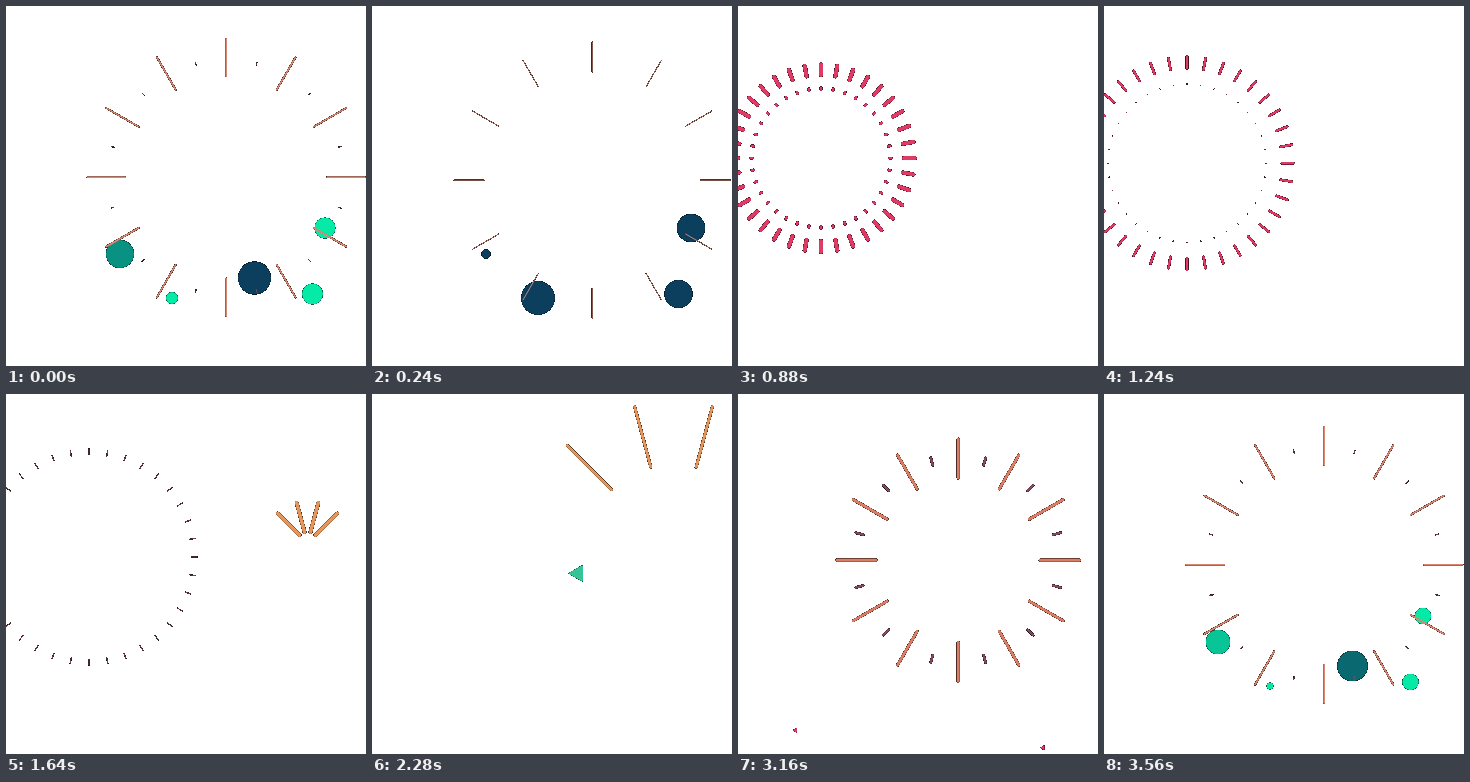
Animation, 360 px wide and 360 px high, one loop 3600 ms. Source, as an HTML page with a canvas:

```html
<!DOCTYPE html>
<html>
<head>
<meta charset="utf-8">
<style>
  html, body { margin: 0; width: 100%; height: 100%; overflow: hidden; background: #fff; }
  canvas { display: block; width: 360px; height: 360px; }
</style>
</head>
<body>
<canvas id="stage" width="360" height="360"></canvas>
<script>
const LOOP = 3600, SIZE = 360;
const ORANGE = [254, 142, 50], SAND = [228, 150, 92], CORAL = [228, 114, 86], BROWN = [208, 146, 128];
const CRIMSON = [222, 60, 102], MAUVE = [124, 76, 88], MINT = [5, 234, 166], NAVY = [12, 62, 94];
const ctx = document.getElementById('stage').getContext('2d', { willReadFrequently: true });

const clamp = v => Math.max(0, Math.min(1, v));
const settle = (age, tau) => 1 - Math.exp(-age / tau);
const mix = (a, b, k) => `rgb(${a.map((v, i) => Math.round(v + (b[i] - v) * k))})`;
const swell = power => p => Math.sin(Math.PI * p) ** power;
const fade = power => p => 1 - p ** power;

// Colour at progress p along evenly spaced stops.
function along(stops, p) {
  const pos = p * (stops.length - 1), i = Math.floor(pos);
  return mix(stops[i], stops[i + 1], pos - i);
}

// Rings of radial dashes; angles in degrees clockwise from the top.
const bursts = [
  { x: 83, y: 144, drift: .0143, start: 311, life: 1600, count: 36, from: 0, step: 10,
    reach: 107, tau: 325, width: 7.4, thin: fade(.8), length: 12, shape: swell(1),
    colors: [ORANGE, ORANGE, CRIMSON, CRIMSON, CRIMSON, MAUVE, MAUVE] },
  { x: 83, y: 144, drift: .0143, start: 311, life: 1100, count: 36, from: 0, step: 10,
    reach: 84, tau: 325, width: 5, thin: fade(1.3), length: 3.4, shape: fade(1),
    colors: [CRIMSON, CRIMSON, MAUVE] },
  { x: 301.5, y: 148, drift: .0133, start: 1552, life: 1650, count: 4, from: -45, step: 30,
    reach: 147, tau: 440, width: 3.8, thin: fade(2), length: 63, shape: swell(.4),
    colors: [SAND, SAND, SAND, SAND, MAUVE, MAUVE, MAUVE] },
  { x: 220.2, y: 160, drift: .0117, start: 2634, life: 1400, count: 12, from: 0, step: 30,
    reach: 126, tau: 320, width: 3.6, thin: fade(2), length: 40, shape: swell(.32),
    colors: [CORAL, BROWN] },
  { x: 220.2, y: 160, drift: .0117, start: 2634, life: 1150, count: 12, from: 15, step: 30,
    reach: 122, tau: 290, width: 3.8, thin: fade(1.5), length: 10, shape: fade(2),
    colors: [CRIMSON, MAUVE, MAUVE] }
];

// Each bubble: x, y, start time.
const bubbles = [
  [114, 248, 3356], [166, 292, 3507], [248.5, 272, 3283], [306.5, 288, 3430], [319, 222, 3430]
];

// Total sideways and downward throw of each triangle.
const throws = [[-153, 74], [-73, 108], [26, 118], [102, 92]];

const ageAt = (t, start) => (t - start + LOOP) % LOOP;

function drawBubble([x, y, start], t) {
  const age = ageAt(t, start);
  if (age > 520) return;
  const r = 18 * Math.sin(Math.PI / 2 * Math.min(1, age / 430)) * (1 - clamp((age - 380) / 140));
  ctx.fillStyle = mix(MINT, NAVY, clamp((age - 175) / 135));
  ctx.beginPath();
  ctx.arc(x, y, r, 0, Math.PI * 2);
  ctx.fill();
}

function drawTriangles(t) {
  const age = ageAt(t, 2279), r = 9.2 * (1 - age / 1130) ** .7;
  if (!(r > 0)) return;
  const k = settle(age, 250);
  ctx.fillStyle = mix(MINT, CRIMSON, settle(age + 20, 85));
  for (const [dx, dy] of throws) {
    const x = 206 + dx * k, y = 179 + dy * k + .00011 * age * age;
    ctx.beginPath();
    ctx.moveTo(x - r, y);
    ctx.lineTo(x + r / 2, y - r * .866);
    ctx.lineTo(x + r / 2, y + r * .866);
    ctx.fill();
  }
}

function drawBurst(b, t) {
  const age = ageAt(t, b.start), p = age / b.life;
  if (p >= 1) return;
  const mid = b.reach * settle(age, b.tau), half = b.length * b.shape(p) / 2;
  const y = b.y + b.drift * age;
  ctx.lineCap = 'round';
  ctx.lineWidth = b.width * b.thin(p);
  ctx.strokeStyle = along(b.colors, p);
  for (let i = 0; i < b.count; i++) {
    const a = (b.from + i * b.step) * Math.PI / 180, sx = Math.sin(a), sy = -Math.cos(a);
    ctx.beginPath();
    ctx.moveTo(b.x + sx * (mid - half), y + sy * (mid - half));
    ctx.lineTo(b.x + sx * (mid + half), y + sy * (mid + half));
    ctx.stroke();
  }
}

// Hard silhouettes: soft edges darken instead of blending into the white.
function hardenEdges() {
  const image = ctx.getImageData(0, 0, SIZE, SIZE), d = image.data;
  for (let i = 0; i < d.length; i += 4) {
    const alpha = d[i + 3];
    for (let c = 0; c < 3; c++) d[i + c] = alpha < 65 ? 255 : d[i + c] * alpha / 255;
    d[i + 3] = 255;
  }
  ctx.putImageData(image, 0, 0);
}

function frame() {
  const t = Math.floor(performance.now() % LOOP / 40) * 40;
  ctx.clearRect(0, 0, SIZE, SIZE);
  bubbles.forEach(b => drawBubble(b, t));
  drawTriangles(t);
  bursts.forEach(b => drawBurst(b, t));
  hardenEdges();
  requestAnimationFrame(frame);
}
frame();
</script>
</body>
</html>
```
